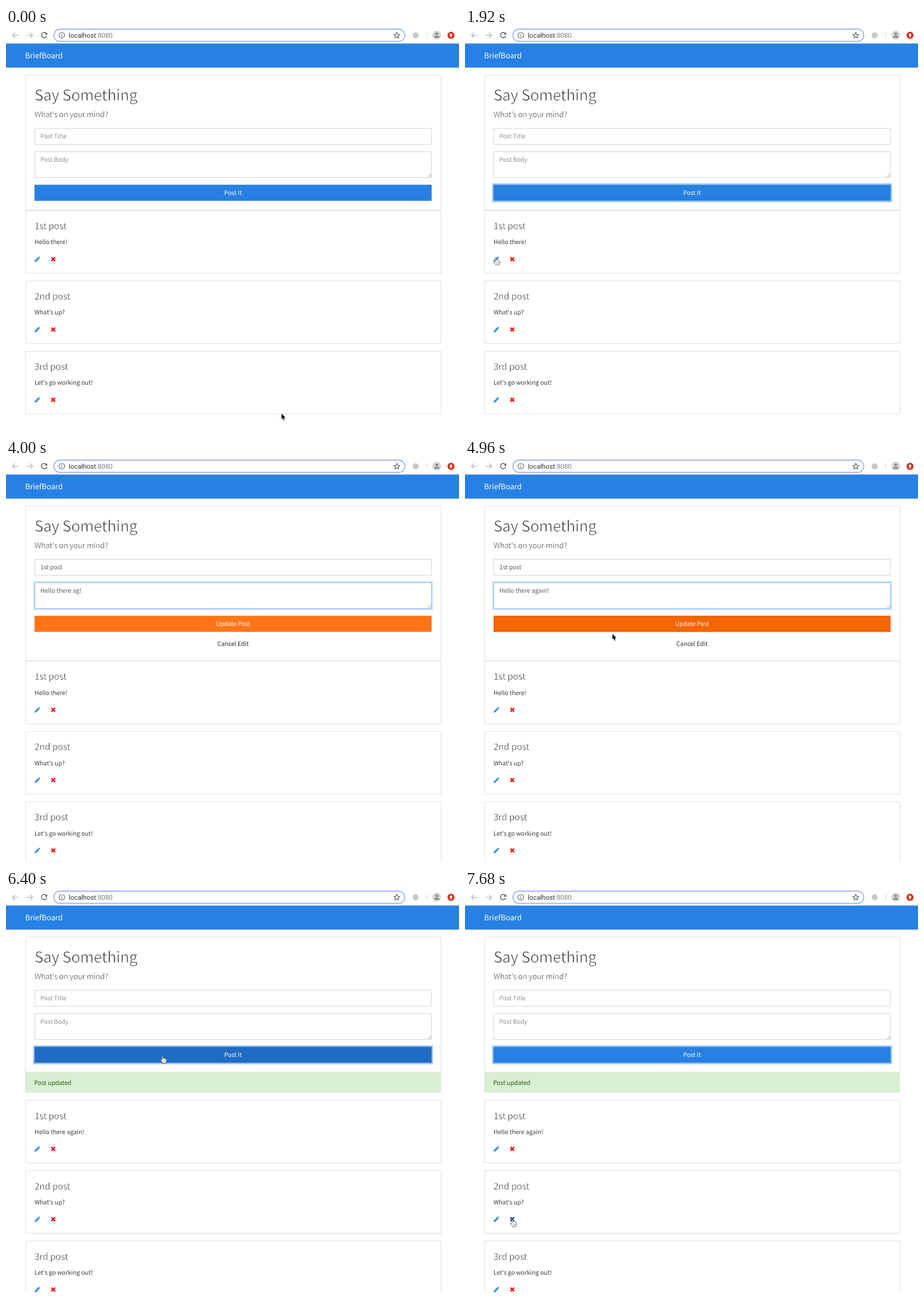
An HTML page for the animation above (8000 ms loop, 794x705 px).

```html
<!DOCTYPE html>
<html lang="en">
<head>
<meta charset="utf-8">
<title>Post form</title>
<style>
html, body { margin: 0; width: 100%; height: 100%; overflow: hidden; background: #fff; }
svg { display: block; width: 794px; height: 705px; }
text {
  font: 400 10.53px "Noto Sans CJK JP", "Noto Sans CJK SC", "Noto Sans CJK", "Open Sans", sans-serif;
  fill: #373a3c; text-rendering: geometricPrecision; white-space: pre;
}
.light { font-weight: 300; }
.thin .light { stroke: #fff; stroke-width: .03em; letter-spacing: -.012em; }
.h1 { font-size: 26.3px; }
.h4 { font-size: 15.79px; }
.lead { font-size: 13.16px; }
.brand { font-size: 13.16px; fill: #fff; }
.url { font: 11.7px Roboto, Arial, sans-serif; }
.hint { fill: #8a8f94; }
.value { fill: #55595c; }
.mid { text-anchor: middle; }
.white { fill: #fff; }
.card { fill: #fff; stroke: #e0e0e0; }
.field { fill: #fff; stroke: #d2d4d6; }
.grip { fill: none; stroke: #8a8a8a; stroke-width: .8; }
.ring { fill: none; stroke-width: 2.5; }

/* one step is 2% of the loop */
.idle, .edit, .done, .old, .post-ring, .sel, .body-ring, .upd-hover, .upd-ring, .can-hover,
.post-hover, .x-hover, .first, .key, .full, .arrow, .hand, .beam, .move, .posts {
  animation: 8s step-end infinite;
}
.idle { animation-name: idle; }
.edit { animation-name: edit; }
.done { animation-name: done; }
.old { animation-name: old; }
.post-ring { animation-name: postRing; }
.sel { animation-name: sel; }
.body-ring { animation-name: bodyRing; }
.upd-hover { animation-name: updHover; }
.upd-ring { animation-name: updRing; }
.can-hover { animation-name: canHover; }
.post-hover { animation-name: postHover; }
.x-hover { animation-name: xHover; }
.first { animation-name: first; }
.key { animation-name: key; animation-delay: calc(var(--n) * 160ms - 8s); }
.full { animation-name: full; }
.arrow { animation-name: arrow; }
.hand { animation-name: hand; }
.beam { animation-name: beam; }
.move { animation-name: move; }
.posts { animation-name: posts; }

@keyframes idle { 0%, 80% { visibility: visible } 26% { visibility: hidden } }
@keyframes edit { 0%, 80% { visibility: hidden } 26% { visibility: visible } }
@keyframes done { 0% { visibility: hidden } 80%, 100% { visibility: visible } }
@keyframes old { 0% { visibility: visible } 80%, 100% { visibility: hidden } }
@keyframes postRing { 0%, 26% { visibility: hidden } 22%, 80%, 100% { visibility: visible } }
@keyframes sel { 0%, 42%, 100% { visibility: hidden } 26% { visibility: visible } }
@keyframes bodyRing { 0%, 78%, 100% { visibility: hidden } 42% { visibility: visible } }
@keyframes updHover { 0%, 64%, 80%, 100% { visibility: hidden } 60%, 76% { visibility: visible } }
@keyframes updRing { 0%, 80%, 100% { visibility: hidden } 78% { visibility: visible } }
@keyframes canHover { 0%, 76%, 100% { visibility: hidden } 64% { visibility: visible } }
@keyframes postHover { 0%, 84%, 100% { visibility: hidden } 80% { visibility: visible } }
@keyframes xHover { 0% { visibility: hidden } 96%, 100% { visibility: visible } }
@keyframes first { 0%, 48%, 100% { visibility: hidden } 26% { visibility: visible } }
@keyframes key { 0% { visibility: visible } 2%, 100% { visibility: hidden } }
@keyframes full { 0%, 80%, 100% { visibility: hidden } 56% { visibility: visible } }
@keyframes arrow {
  0%, 30%, 62%, 84% { visibility: visible }
  16%, 34%, 64%, 96%, 100% { visibility: hidden }
}
@keyframes hand {
  0%, 26%, 62%, 84% { visibility: hidden }
  16%, 60%, 64%, 96%, 100% { visibility: visible }
}
@keyframes beam {
  0%, 30%, 48%, 100% { visibility: hidden }
  26%, 34% { visibility: visible }
}
@keyframes posts {
  0% { transform: translateY(0) }
  26% { transform: translateY(34.4px) }
  80%, 100% { transform: translateY(48.5px) }
}
@keyframes move {
  0% { transform: translate(483px, 674.5px) }
  2% { transform: translate(462px, 640px) }
  4% { transform: translate(380px, 575px) }
  6% { transform: translate(240px, 490px) }
  8% { transform: translate(112px, 425px) }
  10% { transform: translate(57px, 400px) }
  12% { transform: translate(230px, 215px) }
  14% { transform: translate(402px, 48px) }
  16% { transform: translate(54px, 401.5px) }
  26% { transform: translate(56px, 408px) }
  30% { transform: translate(66px, 372px) }
  32% { transform: translate(90px, 264px) }
  34% { transform: translate(109.5px, 226px) }
  36% { transform: translate(115px, 225px) }
  38% { transform: translate(117.5px, 228px) }
  60% { transform: translate(196px, 284px) }
  62% { transform: translate(258.5px, 306px) }
  64% { transform: translate(270px, 315px) }
  66% { transform: translate(274px, 319px) }
  68% { transform: translate(274px, 318px) }
  72% { transform: translate(274px, 310px) }
  74% { transform: translate(274.5px, 296.5px) }
  76% { transform: translate(274.5px, 291px) }
  78% { transform: translate(274.5px, 290px) }
  84% { transform: translate(258px, 330px) }
  86% { transform: translate(236px, 372px) }
  88% { transform: translate(205px, 420px) }
  90% { transform: translate(170px, 470px) }
  92% { transform: translate(135px, 515px) }
  94% { transform: translate(105px, 552px) }
  96%, 100% { transform: translate(83.5px, 576px) }
}
</style>
</head>
<body>
<svg viewBox="0 0 794 705">
  <defs>
    <g id="pen">
      <path d="M0 10 .5 7.2 6.5 1.2 8.9 3.6 2.9 9.6ZM7.1.6Q7.8-.1 8.5.6L9.5 1.6Q10.2 2.3 9.5 3L9.3 3.2 6.9.8Z"/>
      <path d="M1 7.7 2.4 9.1M2.6 6.8 6.4 3" fill="none" stroke="#fff" stroke-width=".5"/>
    </g>
    <path id="cross" d="M1 .8 7.4 7.2M7.4 .8 1 7.2" stroke-width="2.4"/>
    <path id="grip" class="grip" d="M739.5 260.5 745 255M742.5 260.5 745 258"/>
    <g id="icons">
      <use href="#pen" x="50" y="399.3" fill="#2780e3"/>
      <use href="#cross" x="78.6" y="400.4" stroke="#f00"/>
    </g>
  </defs>

  <!-- browser bar -->
  <g fill="none" stroke="#b9bbbe" stroke-width="1.4">
    <path d="M21.5 12.7H11.5M16 8 11.3 12.7 16 17.4"/>
    <path d="M36.5 12.7H46.5M42 8 46.7 12.7 42 17.4"/>
    <path d="M70.6 9.4A4.7 4.7 0 1 0 71.4 14" stroke="#55585c" stroke-width="1.5"/>
    <path d="M72.2 7.4V11.8H67.8Z" fill="#55585c" stroke="none"/>
    <rect x="84" y="2" width="615" height="21.5" rx="10.7" stroke="#9db9ea" stroke-width="1.8"/>
    <circle cx="97.8" cy="12.7" r="5" stroke="#5f6368" stroke-width="1.1"/>
    <path d="M97.8 12V15.4M97.8 9.8V11" stroke="#5f6368" stroke-width="1.2"/>
    <path d="M685 7.6 686.4 11.1 690.1 11.4 687.3 13.8 688.2 17.4 685 15.5 681.8 17.4 682.7 13.8 679.9 11.4 683.6 11.1Z" stroke="#55585c" stroke-width="1.1"/>
    <path d="M737.5 7V18" stroke="#d5d5d5" stroke-width="1"/>
  </g>
  <text class="url" x="110" y="16.8" style="fill:#2f3235">localhost<tspan fill="#7b7f84">:8080</tspan></text>
  <circle cx="718" cy="12.8" r="5.2" fill="#c5c7c9"/>
  <circle cx="755" cy="12.5" r="7.7" fill="#d4d4d4"/>
  <circle cx="755" cy="10.3" r="2.4" fill="#86888b"/>
  <path d="M750.3 17Q750.5 13.8 755 13.8T759.7 17Z" fill="#86888b"/>
  <circle cx="780" cy="12.8" r="6.2" fill="#d93025"/>
  <path d="M780 9 783.2 12.8H781.2V16H778.8V12.8H776.8Z" fill="#fff"/>
  <rect y="26.5" width="794" height="1" fill="#d3d7dc"/>

  <rect y="27.3" width="794" height="42" fill="#2780e3"/>
  <text class="brand" x="33.6" y="53">BriefBoard</text>

  <!-- form -->
  <rect class="card idle" x="34.5" y="82.5" width="728" height="236"/>
  <rect class="card edit" x="34.5" y="82.5" width="728" height="270.4"/>
  <text class="light h1" x="50" y="127.2">Say Something</text>
  <text class="light lead" x="50" y="156">What's on your mind?</text>
  <rect class="field" x="50.5" y="175.5" width="695" height="28"/>
  <rect class="field" x="50.5" y="216.5" width="695" height="45"/>
  <g class="body-ring">
    <rect class="ring" x="49" y="215" width="698" height="48" stroke="#c9dff8"/>
    <rect x="50.5" y="216.5" width="695" height="45" fill="none" stroke="#93c0f1"/>
  </g>
  <use href="#grip"/>

  <g class="idle">
    <text class="hint" x="60.3" y="193.4">Post Title</text>
    <text class="hint" x="60.3" y="234.2">Post Body</text>
    <rect x="50" y="274.2" width="696" height="28.2" fill="#2780e3"/>
  </g>
  <rect class="post-hover" x="50" y="274.2" width="696" height="28.2" fill="#1f6cc4"/>
  <rect class="ring post-ring" x="48.8" y="273" width="698.4" height="30.6" stroke="#9bc5f3"/>
  <text class="mid white idle" x="398" y="292.3">Post It</text>

  <g class="edit">
    <text class="value" x="60.3" y="193.4">1st post</text>
    <rect x="50" y="274.2" width="696" height="28.2" fill="#ff7518"/>
  </g>
  <text class="value first" x="60.3" y="234.2">Hello there!</text>
  <text class="value key" style="--n:24" x="60.3" y="234.2">Hello there a!</text>
  <text class="value key" style="--n:25" x="60.3" y="234.2">Hello there ag!</text>
  <text class="value key" style="--n:26" x="60.3" y="234.2">Hello there aga!</text>
  <text class="value key" style="--n:27" x="60.3" y="234.2">Hello there agai!</text>
  <text class="value full" x="60.3" y="234.2">Hello there again!</text>
  <rect class="upd-hover" x="50" y="274.2" width="696" height="28.2" fill="#f46505"/>
  <rect class="ring upd-ring" x="48.8" y="273" width="698.4" height="30.6" stroke="#ffc8a3"/>
  <rect class="can-hover" x="50" y="308.6" width="696" height="28.2" fill="#e6e9ec"/>
  <g class="edit">
    <text class="mid white" x="398" y="292.3">Update Post</text>
    <text class="mid" x="398" y="326.7" style="fill:#212529">Cancel Edit</text>
  </g>

  <g class="done">
    <rect x="33.6" y="319" width="729" height="35.6" fill="#d9efd3"/>
    <text x="49.5" y="341" style="fill:#1f5c0c">Post updated</text>
  </g>

  <!-- posts -->
  <g class="posts">
    <rect class="card" x="34.5" y="319.5" width="728" height="109.5"/>
    <rect class="sel" x="50" y="367" width="26" height="14.8" fill="#b4d5fa"/>
    <text class="light h4" x="50" y="352">1st post</text>
    <text class="old" x="50" y="378.4">Hello there!</text>
    <text class="done" x="50" y="378.4">Hello there again!</text>
    <use href="#icons"/>

    <rect class="card" x="34.5" y="442.5" width="728" height="109.5"/>
    <text class="light h4" x="50" y="475">2nd post</text>
    <text x="50" y="501.4">What's up?</text>
    <use href="#icons" y="123"/>
    <use class="x-hover" href="#cross" x="78.6" y="523.4" stroke="#165ba8"/>

    <rect class="card" x="34.5" y="565.5" width="728" height="109.5"/>
    <text class="light h4" x="50" y="598">3rd post</text>
    <text x="50" y="624.4">Let's go working out!</text>
    <use href="#icons" y="246"/>
  </g>

  <!-- pointer -->
  <g class="move" stroke-linejoin="round">
    <path class="arrow" d="M0 0V9.8L2.2 7.8 3.8 11.7 5.4 11 3.8 7.2H6.8Z" fill="#000" stroke="#fff" stroke-width="1.2" paint-order="stroke"/>
    <g class="hand" stroke="#3a3a3a" stroke-width=".8">
      <path d="M-1 7.4V1Q0-.6 1 1V4.6Q2.2 3.8 3 5 4.2 4.3 5 5.5 6.6 5.2 6.9 6.8V9Q6.6 10.8 5.7 11.8V13H-.2V11.8Q-2 10-3.7 7.4-3.2 5.6-1 7.4Z" fill="#fff"/>
      <path d="M1.4 8V10.6M3 8V10.6M4.6 8V10.6" stroke-width=".5"/>
    </g>
    <path class="beam" d="M-2.8-6Q0-6 0-4.6 0-6 2.8-6M0-4.6V4.6M-2.8 6Q0 6 0 4.6 0 6 2.8 6M-1.6 2H1.6" fill="none" stroke="#333" stroke-width=".9"/>
  </g>
</svg>
<script>
// Slim and tighten the regular face when no light weight is installed.
const ctx = document.createElement('canvas').getContext('2d');
const measure = weight => {
  ctx.font = `${weight} 100px "Noto Sans CJK JP", "Noto Sans CJK SC", "Noto Sans CJK", "Open Sans", sans-serif`;
  return ctx.measureText('Say Something').width;
};
if (measure(300) === measure(400)) document.querySelector('svg').classList.add('thin');
</script>
</body>
</html>
```
